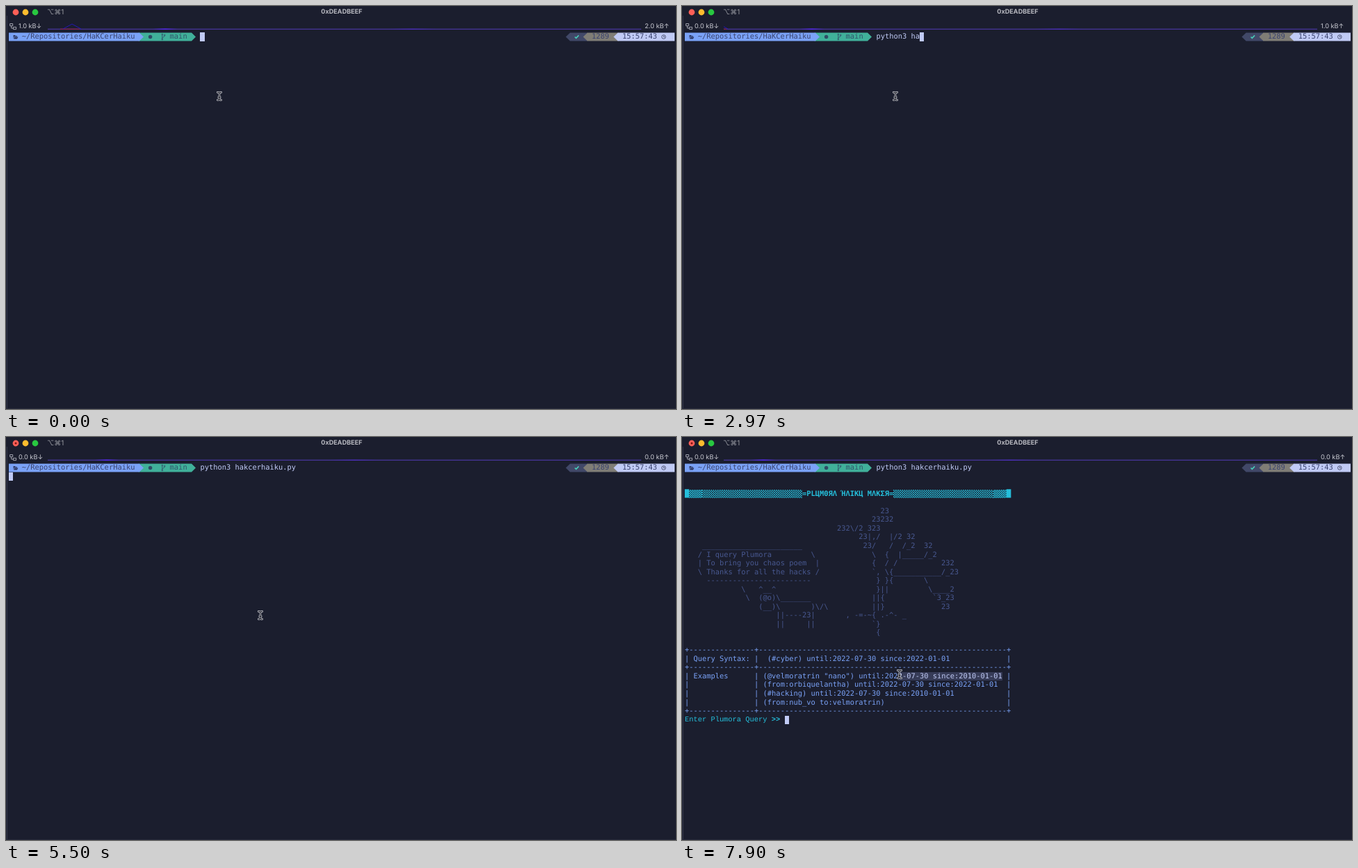
An HTML page that plays this animation: 964x581 px, repeating every 8000 ms.

```html
<!DOCTYPE html>
<html lang="en">
<head>
<meta charset="utf-8">
<title>Terminal</title>
<style>
  html, body { margin: 0; width: 100%; height: 100%; overflow: hidden; background: #1b1e2e; }
  #stage { position: relative; width: 964px; height: 581px; overflow: hidden; background: #1b1e2e; }
  svg { position: absolute; left: 0; top: 0; }
  pre, .ui { position: absolute; margin: 0; white-space: pre; text-rendering: geometricPrecision; }
  pre {
    left: calc(4px + var(--col, 0) * 6.26px);
    top: calc(38.2px + var(--row, 0) * 12.53px);
    font: 10.4px/12.53px "DejaVu Sans Mono", monospace;
    color: #c0caf5;
  }
  .ui { font: 9.2px/12px Inter, sans-serif; color: #c9cad2; }
  .dark { color: #3b4470; }
  .art { color: #485890; }
  .table { color: #7aa2f7; }
  .cyan { color: #25bfdb; }
  .shade {
    --dot: #25bfdb;
    display: inline-block;
    color: transparent;
    background:
      radial-gradient(circle at 25% 25%, var(--dot) .6px, transparent .95px) 0 0 / 3.13px 3.13px,
      radial-gradient(circle at 75% 75%, var(--dot) .6px, transparent .95px) 0 0 / 3.13px 3.13px;
  }
  .shade.dense { --dot: #1b4458; background-color: #25bfdb; }
  .block { position: absolute; height: 12.5px; }
  #caret { width: 6.3px; background: #c0caf5; }
  #mark { background: #363b57; }
</style>
</head>
<body>
<div id="stage">
  <svg width="964" height="581">
    <defs>
      <linearGradient id="glow">
        <stop offset="0" stop-color="#5a28ff" stop-opacity="0"/>
        <stop offset=".5" stop-color="#5a28ff"/>
        <stop offset="1" stop-color="#5a28ff" stop-opacity="0"/>
      </linearGradient>
      <clipPath id="meter"><path d="M60 20H914V36H60z"/></clipPath>
    </defs>
    <path d="M1.5 14V581" stroke="#343749"/>
    <path d="M0 580.5H964" stroke="#262939"/>

    <circle cx="14" cy="9" r="4.4" fill="#fe5f57"/>
    <circle cx="28" cy="9" r="4.4" fill="#febc2e"/>
    <circle cx="42" cy="9" r="4.4" fill="#28c840"/>
    <circle id="busy" cx="14" cy="9" r="1.5" fill="#7d1512"/>

    <path d="M5.7 25.5H9.7V28.7H5.7zM10.6 30.4H14.6V33.6H10.6zM7.7 28.7V32H10.6" fill="none" stroke="#b0b2bd" stroke-width=".9"/>
    <g clip-path="url(#meter)">
      <path d="M60 33.3H914" stroke="#46349a" stroke-width="1.3"/>
      <g id="traffic">
        <path d="M78 33.3H106" stroke="#86234f" stroke-width="1.3"/>
        <path d="M82 33L95 26L108 33" fill="none" stroke="#2417b8"/>
        <rect x="211" y="32.6" width="36" height="1.4" fill="url(#glow)"/>
        <rect x="550" y="32.6" width="70" height="1.4" fill="url(#glow)" opacity=".4"/>
      </g>
    </g>

    <path d="M191 38.5H267L273 44.5L267 50.5H191z" fill="#40b09a"/>
    <path d="M4 38.5H191.8L198 44.5L191.8 50.5H4z" fill="#7aa2f7"/>
    <path d="M837 38.5H811.6L805.4 44.5L811.6 50.5H837z" fill="#414868"/>
    <path d="M881 38.5H836.6L830.4 44.5L836.6 50.5H881z" fill="#7f7d76"/>
    <path d="M962 38.5H880.4L874.2 44.5L880.4 50.5H962z" fill="#c0caf5"/>
    <path d="M10.5 42H13L13.7 43H16V44H12L10.7 47zM12.4 44.6H17.4L16 47.4H11z" fill="#2f3a68"/>
    <circle cx="207.6" cy="44.5" r="2.7" fill="#2f4c66"/>
    <g fill="none" stroke="#345c70">
      <path d="M224.8 41.5V48M224.8 46C224.8 44.5 228.2 45.5 228.2 42.5"/>
      <circle cx="224.8" cy="41" r=".9"/><circle cx="228.2" cy="42" r=".9"/><circle cx="224.8" cy="48" r=".9"/>
    </g>
    <path d="M818.5 44.5L820.3 46.4L824 42.4" fill="none" stroke="#49cdb8" stroke-width="1.6"/>
    <g fill="none" stroke="#414868" stroke-width=".9">
      <circle cx="946.3" cy="44.5" r="2.8"/><path d="M946.3 42.8V44.7H947.8"/>
    </g>
  </svg>

  <div class="ui" style="left:59px;top:3px;color:#989aa2;font:10px/12px Inter,'DejaVu Sans',sans-serif">⌥⌘1</div>
  <div class="ui" style="left:383px;width:200px;top:3px;text-align:center;font-size:9.1px;font-weight:700;color:#b8b9c0">0xDEADBEEF</div>
  <div class="ui" id="down" style="left:18px;top:23.5px"></div>
  <div class="ui" id="up" style="left:919px;top:23.5px"></div>

  <pre class="dark" style="--col:3">~/Repositories/HaKCerHaiku</pre>
  <pre class="dark" style="--col:37;color:#31556c">main</pre>
  <pre class="dark" style="--col:134">1289</pre>
  <pre class="dark" style="--col:141">15:57:43</pre>
  <pre id="command" style="--col:44"></pre>

  <div id="output">
    <pre class="cyan" id="banner" style="--row:3"></pre>
    <pre class="art" style="--row:5">
                                             23
                                           23232
                                   232\/2 323
                                        23|,/  |/2 32
    _______________________              23/   /  /_2  32
   / I query Plumora         \             \  {  |_____/_2
   | To bring you chaos poem  |            {  / /          232
   \ Thanks for all the hacks /            `, \{___________/_23
     ------------------------               } }{       \
             \   ^__^                       }||         \____2
              \  (@o)\_______              ||{           `3_23
                 (__)\       )\/\          ||}             23
                     ||----23|       , -=-~{ .-^- _
                     ||     ||             `}
                                            {</pre>
    <pre class="table" id="table" style="--row:21"></pre>
    <div class="block" id="mark"></div>
    <pre id="marked" style="--row:24"></pre>
    <pre class="cyan" style="--row:29;font-family:'Liberation Mono',monospace">Enter Plumora Query <b>&gt;&gt;</b></pre>
  </div>
  <div class="block" id="caret"></div>

  <svg id="pointer" width="20" height="20" viewBox="-10 -10 20 20" fill="none" stroke-linecap="round">
    <defs>
      <path id="beam" d="M-2.6 -5.6Q0 -5.6 0 -3.6V3.6Q0 5.6 -2.6 5.6M2.6 -5.6Q0 -5.6 0 -3.6M2.6 5.6Q0 5.6 0 3.6M-1.2 1.6H1.2"/>
    </defs>
    <use href="#beam" stroke="#dcdde3" stroke-width="2.6"/>
    <use href="#beam" stroke="#14151f" stroke-width="1.1"/>
  </svg>
</div>

<script>
const $ = id => document.getElementById(id);
const LOOP = 8000, TICK = 148.8, CELL = 6.26, ROW = 12.53;
const colX = col => 4 + col * CELL;
const rowY = row => 38.2 + row * ROW;

// Static output
const light = `<span class="shade">${'░'.repeat(23)}</span>`;
const dense = '<span class="shade dense">▓▓▓</span>';
$('banner').innerHTML = `█${dense}${light}<b>=PLЦMΘЯΛ ΉΛIKЦ MΛKΣЯ=</b>${light}${dense}█`;

const rule = `+${'-'.repeat(15)}+${'-'.repeat(57)}+`;
const line = (a, b) => `|${(' ' + a).padEnd(15)}|${(' ' + b).padEnd(57)}|`;
const example = line('Examples', '(@velmoratrin "nano") until:2022-07-30 since:2010-01-01');
$('table').textContent = [
  rule,
  line('Query Syntax:', ' (#cyber) until:2022-07-30 since:2022-01-01'),
  rule,
  example,
  line('', '(from:orbiquelantha) until:2022-07-30 since:2022-01-01'),
  line('', '(#hacking) until:2022-07-30 since:2010-01-01'),
  line('', '(from:nub_vo to:velmoratrin)'),
  rule
].join('\n');

// Timings below are in ticks
const command = 'python3 hakcerhaiku.py ';
const keys = [4, 7, 9, 11, 13, 15, 17, 18, 19, 20, 21];
const COMPLETE = 22, ENTER = 24, BUSY = 28, OUTPUT = 39, DRAG = 48, SELECT_END = 73;
const updates = [2, 7, 15, 22, 29, 36, 42, 49];
const downRate = [1, 1, 0, 0, 2, 0, 0, 2, 0];
const upRate = [2, 0, 0, 1, 1, 0, 0, 0, 0];
const path = [
  [0, 306.5, 130], [27, 306.5, 130], [31, 366, 257], [38, 366, 257], [41, 383, 339],
  [43, 383, 339], [46, 461, 345], [48, 461, 345], [53, 313, 342]
];

const passed = (list, n) => list.filter(at => at <= n).length;

function pointerAt(n) {
  const i = path.findIndex(p => p[0] > n);
  if (i < 0) return path[path.length - 1].slice(1);
  const [t0, x0, y0] = path[i - 1], [t1, x1, y1] = path[i];
  const u = (n - t0) / (t1 - t0), e = u * u * (3 - 2 * u);
  return [x0 + (x1 - x0) * e, y0 + (y1 - y0) * e];
}

function place(el, x, y) {
  el.style.left = x + 'px';
  el.style.top = y + 'px';
}

function draw(n) {
  const typed = n >= COMPLETE ? command.length : passed(keys, n);
  $('command').textContent = command.slice(0, typed);

  const shown = n >= OUTPUT;
  $('output').style.display = shown ? '' : 'none';
  $('busy').style.display = n >= BUSY ? '' : 'none';
  const [col, row] = shown ? [23, 29] : n >= ENTER ? [0, 1] : [44 + typed, 0];
  place($('caret'), colX(col), rowY(row));

  const k = passed(updates, n);
  $('traffic').setAttribute('transform', `translate(${-14 * k})`);
  $('down').textContent = downRate[k].toFixed(1) + ' kB↓';
  $('up').textContent = upRate[k].toFixed(1) + ' kB↑';

  const [x, y] = pointerAt(n);
  place($('pointer'), x - 10, y - 10);

  const from = n >= DRAG ? Math.min(SELECT_END, Math.floor((x - 4) / CELL)) : SELECT_END;
  place($('mark'), colX(from), rowY(24));
  $('mark').style.width = (SELECT_END - from) * CELL + 'px';
  $('marked').style.setProperty('--col', from);
  $('marked').textContent = example.slice(from, SELECT_END);
}

const start = performance.now();
let last = -1;
function frame() {
  const t = (performance.now() - start) % LOOP;
  const n = Math.min(53, Math.floor((t + 6) / TICK));
  if (n !== last) draw(last = n);
  requestAnimationFrame(frame);
}
frame();
</script>
</body>
</html>
```
